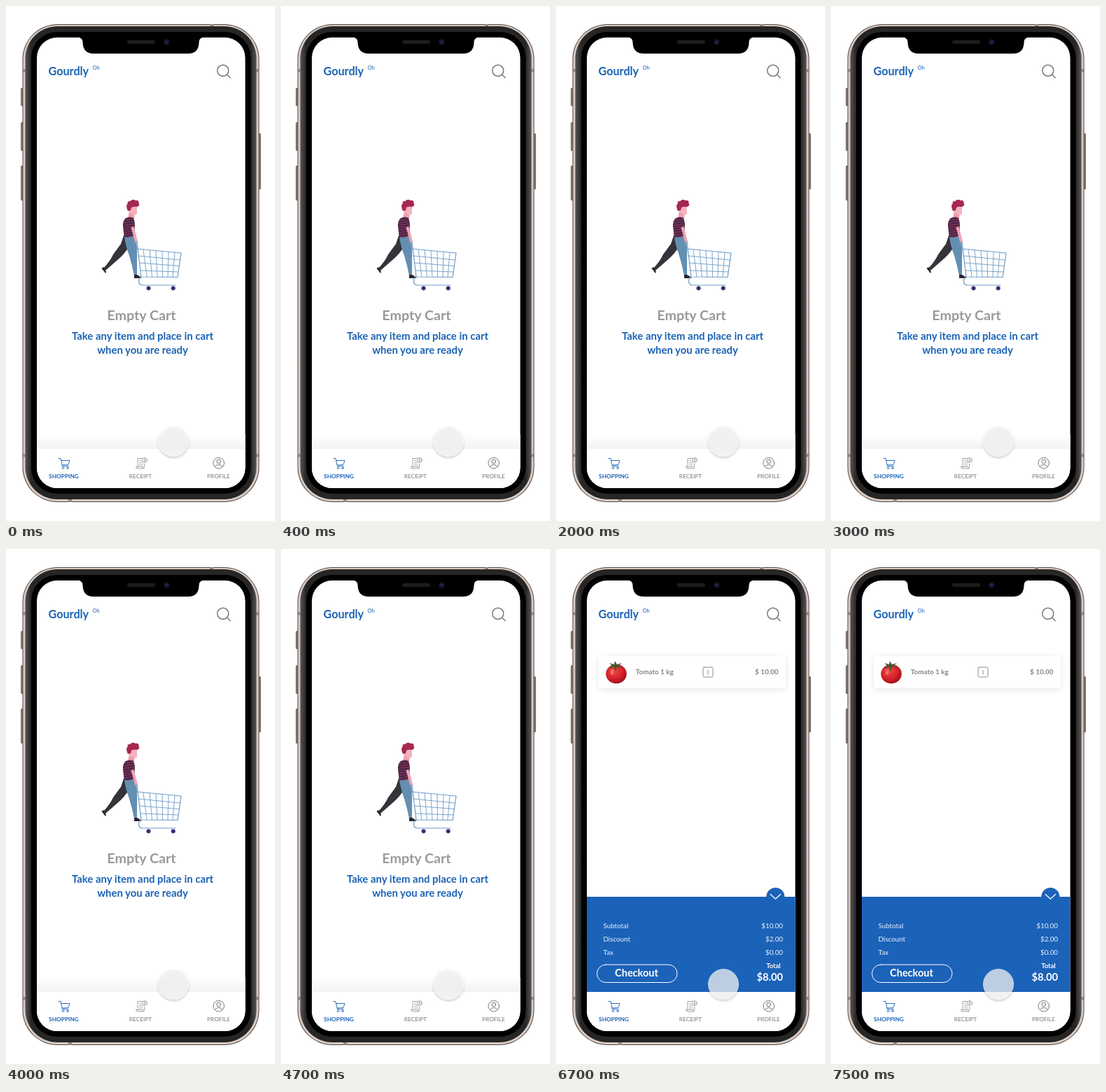
Animation, 384 px wide and 736 px high, one loop 8 s. Source, as an HTML page:

```html
<!DOCTYPE html>
<html lang="en">
<head>
<meta charset="utf-8">
<title>Shopping cart</title>
<style>
  html, body { margin: 0; width: 100%; height: 100%; overflow: hidden; background: #fff; }
  svg { display: block; width: 100%; height: 100%; font-family: Lato, sans-serif; }
  .line { fill: none; stroke-linecap: round; stroke-linejoin: round; }
  .bold { font-weight: 700; }
  .mid { text-anchor: middle; }
  .end { text-anchor: end; }
  .blue { fill: #1a63b5; }
  .tab { font-size: 8.3px; fill: #777; }
</style>
</head>
<body>
<svg viewBox="0 0 384 736">
  <defs>
    <linearGradient id="band" x1="0" x2="1" y1="0" y2="0">
      <stop offset="0" stop-color="#555"/>
      <stop offset=".025" stop-color="#262626"/>
      <stop offset=".975" stop-color="#262626"/>
      <stop offset="1" stop-color="#555"/>
    </linearGradient>
    <linearGradient id="fade" x1="0" x2="0" y1="0" y2="1">
      <stop offset="0" stop-color="#fff"/>
      <stop offset="1" stop-color="#f3f3f3"/>
    </linearGradient>
    <radialGradient id="skin" cx=".4" cy=".35" r=".7">
      <stop offset="0" stop-color="#ee4a42"/>
      <stop offset=".6" stop-color="#d3202a"/>
      <stop offset="1" stop-color="#9c1018"/>
    </radialGradient>
    <pattern id="stripes" width="4" height="3.4" patternUnits="userSpaceOnUse" patternTransform="rotate(-8)">
      <rect width="4" height="3.4" fill="#2c2b4b"/>
      <rect width="4" height="1.2" fill="#b52a4c"/>
    </pattern>
    <filter id="cardShadow" x="-20%" y="-60%" width="140%" height="220%">
      <feDropShadow dx="0" dy="2" stdDeviation="5" flood-opacity=".1"/>
    </filter>
    <filter id="touchShadow" x="-30%" y="-30%" width="160%" height="160%">
      <feDropShadow dx="0" dy="2" stdDeviation="1.6" flood-opacity=".28"/>
    </filter>
    <clipPath id="screen"><rect x="44" y="45" width="297.5" height="644" rx="29"/></clipPath>
  </defs>

  <!-- Phone body -->
  <g fill="#82766f">
    <rect x="21" y="117" width="5" height="26" rx="1.5"/>
    <rect x="21" y="166" width="5" height="41" rx="1.5"/>
    <rect x="21" y="228" width="5" height="50" rx="1.5"/>
    <rect x="359" y="182" width="5" height="80" rx="1.5"/>
  </g>
  <rect x="23.5" y="26" width="338" height="683" rx="50" fill="#51494a"/>
  <rect x="24.5" y="27" width="336" height="681" rx="49" fill="#d9cbc1"/>
  <g fill="#91877f">
    <rect x="23.5" y="90" width="4" height="4.5"/><rect x="357.5" y="90" width="4" height="4.5"/>
    <rect x="23.5" y="640" width="4" height="4.5"/><rect x="357.5" y="640" width="4" height="4.5"/>
    <rect x="291" y="26" width="5" height="3"/><rect x="89" y="705" width="5" height="4"/>
  </g>
  <rect x="27.5" y="29" width="330" height="676" rx="46" fill="url(#band)"/>
  <rect x="36" y="37" width="313.5" height="660" rx="37"/>

  <g clip-path="url(#screen)">
    <rect x="44" y="45" width="298" height="644" fill="#fff"/>

    <!-- Header -->
    <text x="60.5" y="98.6" font-size="16.2" class="bold blue">Gourdly</text>
    <text x="123.5" y="91" font-size="7.6" class="blue">Oh</text>
    <g class="line" stroke="#777" stroke-width="1.5">
      <circle cx="309.7" cy="92.3" r="8"/><path d="M315.5 98 320 102.5"/>
    </g>

    <g id="empty">
      <rect x="44" y="612" width="298" height="21" fill="url(#fade)"/>

      <!-- Shopper -->
      <path d="M168 328 180 330 176 343Q170 354 158 364L142 378 139 375Q149 364 153 355L164 340Z" fill="#35343a"/>
      <path d="M139 373 136.500 375 142 382 143 380 141 376Z" fill="#2b2430"/>
      <path d="M169 329 184.500 327Q188 345 187 358L187 385 183 385.500Q180 370 176 357Q170 341 169 329Z" fill="#638fb3"/>
      <path d="M183 384 187 384 193 387.500V389H183Z" fill="#2b2430"/>
      <path d="M176 292 184 294 183 304 174 304Z" fill="#ee9fae"/>
      <path d="M175 286Q176 282 182 283L187 286 187 297Q185 300 181 298L176 294Z" fill="#f5b3bd"/>
      <path d="M174 293Q170 285 174 282Q172 279 177 279Q181 275 185 278Q190 277 189.500 282Q192 285 187 287Q182 286 179 288L178 292Z" fill="#a52850"/>
      <path d="M171 303Q177 300 182 303Q185 311 183.500 318L184 328Q176 332 168.500 330Q168 322 167 316Q166 307 171 303Z" fill="url(#stripes)"/>
      <path d="M178.500 311 182.500 323 186 337" class="line" stroke="#f0a5b3" stroke-width="4"/>
      <path d="M172 304Q180 302 182 315L176 318Z" fill="url(#stripes)"/>

      <!-- Cart -->
      <g class="line" stroke="#6f9cc8" stroke-width=".9">
        <path d="M183 338 187 337 193 387 245 387.500 250 353 187 347" stroke-width="1.2"/>
        <path d="M188.500 357 248.500 363M190 367 247 371.500M191.500 378 246 380
          M196 348 201 387M205 349 208.500 387M214 350 216 387M223 350.500 223.500 387M232 351.500 231 387M241 352 238 387"/>
        <path d="M193 387Q189.500 388 189.500 393Q189.500 399 195 399H242" stroke-width="1.2"/>
      </g>
      <g fill="#2d2b70" stroke="#77709b" stroke-width=".7">
        <circle cx="203.500" cy="403.300" r="2.900"/><circle cx="238.700" cy="403.300" r="2.900"/>
      </g>

      <text x="193.500" y="449" font-size="19.700" class="bold mid" fill="#999">Empty Cart</text>
      <g font-size="14.900" class="bold mid blue">
        <text x="195" y="476.500">Take any item and place in cart</text>
        <text x="195" y="496.500">when you are ready</text>
      </g>
    </g>

    <g id="filled">
      <rect x="61" y="153" width="266.500" height="45.500" rx="3" fill="#fff" filter="url(#cardShadow)"/>
      <ellipse cx="86" cy="178.500" rx="14.800" ry="13.700" fill="url(#skin)"/>
      <ellipse cx="80" cy="176" rx="2.500" ry="4" fill="#f58d84" opacity=".6"/>
      <path d="M84 160 87 165 94 163 89 167 96 170 87 168.500 85 175 83 168.500 75 171 80 166.500 76 163 83 165Z" fill="#46552f"/>
      <g font-size="9.900" class="bold" fill="#858585">
        <text x="113.800" y="179.300">Tomato 1 kg</text>
        <text x="317.500" y="179.300" class="end">$ 10.00</text>
      </g>
      <rect x="210" y="169" width="14" height="14" rx="1.500" class="line" stroke="#8c8c8c"/>
      <text x="217" y="179.300" font-size="9" class="mid" fill="#777" font-family="Liberation Serif, serif">1</text>

      <!-- Totals -->
      <g fill="#1b62b9"><rect x="44" y="497" width="298" height="136"/><circle cx="313.300" cy="497" r="13"/></g>
      <path d="M306 493.500 313.300 500 320.600 493.500" class="line" stroke="#fff" stroke-width="1.300"/>
      <g id="sums" font-size="9.800" fill="#eef3fa"></g>
      <rect x="58.500" y="594" width="114.500" height="25.500" rx="12.750" class="line" stroke="#fff"/>
      <g class="bold" fill="#fff">
        <text x="115" y="611.200" font-size="14.500" class="mid">Checkout</text>
        <text x="310.500" y="599" font-size="9.400" class="mid">Total</text>
        <text x="324" y="616.800" font-size="14.700" class="end">$8.00</text>
      </g>
    </g>

    <!-- Tab bar -->
    <rect x="44" y="633" width="298" height="56" fill="#fff"/>
    <g class="line" stroke="#2d6fbd">
      <path d="M75 646.500H78L80.500 657.500H89M78.700 649.500H91L89 655.500 80 656"/>
      <circle cx="81.500" cy="660.200" r="1.300"/><circle cx="88" cy="660.200" r="1.300"/>
    </g>
    <g class="line" stroke="#8b8b8b" stroke-width=".8">
      <path d="M195 646.500H188V658.500H185.500Q185.500 661 188 661H195.500Q197.500 661 197.500 658.500V654.500M188 658.500H195.500Q195.500 661 197 661M190.500 650H193M190.500 653H195M190.500 656H195"/>
      <circle cx="198" cy="649" r="3.400"/><path d="M199 647.500H197.500Q196.500 649 198 649T198.500 650.600H197"/>
    </g>
    <g class="line" stroke="#777">
      <circle cx="303.700" cy="653.200" r="7.800"/><circle cx="303.700" cy="651" r="2.900"/>
      <path d="M298.300 658.500Q299.500 655.500 303.700 655.500T309.100 658.500"/>
    </g>
    <g class="tab mid">
      <text x="82.500" y="675" class="bold blue">SHOPPING</text>
      <text x="192" y="675">RECEIPT</text>
      <text x="303.500" y="675">PROFILE</text>
    </g>

    <circle cx="239" cy="622" r="21.700" fill="#f5f5f5" fill-opacity=".72" stroke="#fff" stroke-opacity=".45" filter="url(#touchShadow)"/>
  </g>

  <!-- Notch -->
  <path d="M102 44.500Q109.500 45 109.500 52Q110 68 125 68H260Q275 68 275.500 52Q275.500 45 283 44.500Z"/>
  <rect x="173" y="48.800" width="40" height="5.400" rx="2.700" fill="#1c1c1e"/>
  <circle cx="229.300" cy="51.500" r="4.300" fill="#121423"/>
  <circle cx="229.300" cy="51.500" r="2" fill="#20265c"/>
</svg>
<script>
  const LOOP = 8000, ITEM_ADDED = 6300;
  const byId = id => document.getElementById(id);
  const empty = byId("empty"), filled = byId("filled");

  byId("sums").innerHTML = [["Subtotal", "$10.00"], ["Discount", "$2.00"], ["Tax", "$0.00"]]
    .map(([label, value], i) => {
      const y = 541.5 + i * 19;
      return `<text x="67.5" y="${y}">${label}</text><text x="324" y="${y}" class="end">${value}</text>`;
    }).join("");

  const start = performance.now();
  function draw() {
    const added = (performance.now() - start) % LOOP >= ITEM_ADDED;
    empty.style.display = added ? "none" : "";
    filled.style.display = added ? "" : "none";
    requestAnimationFrame(draw);
  }
  draw();
</script>
</body>
</html>
```
